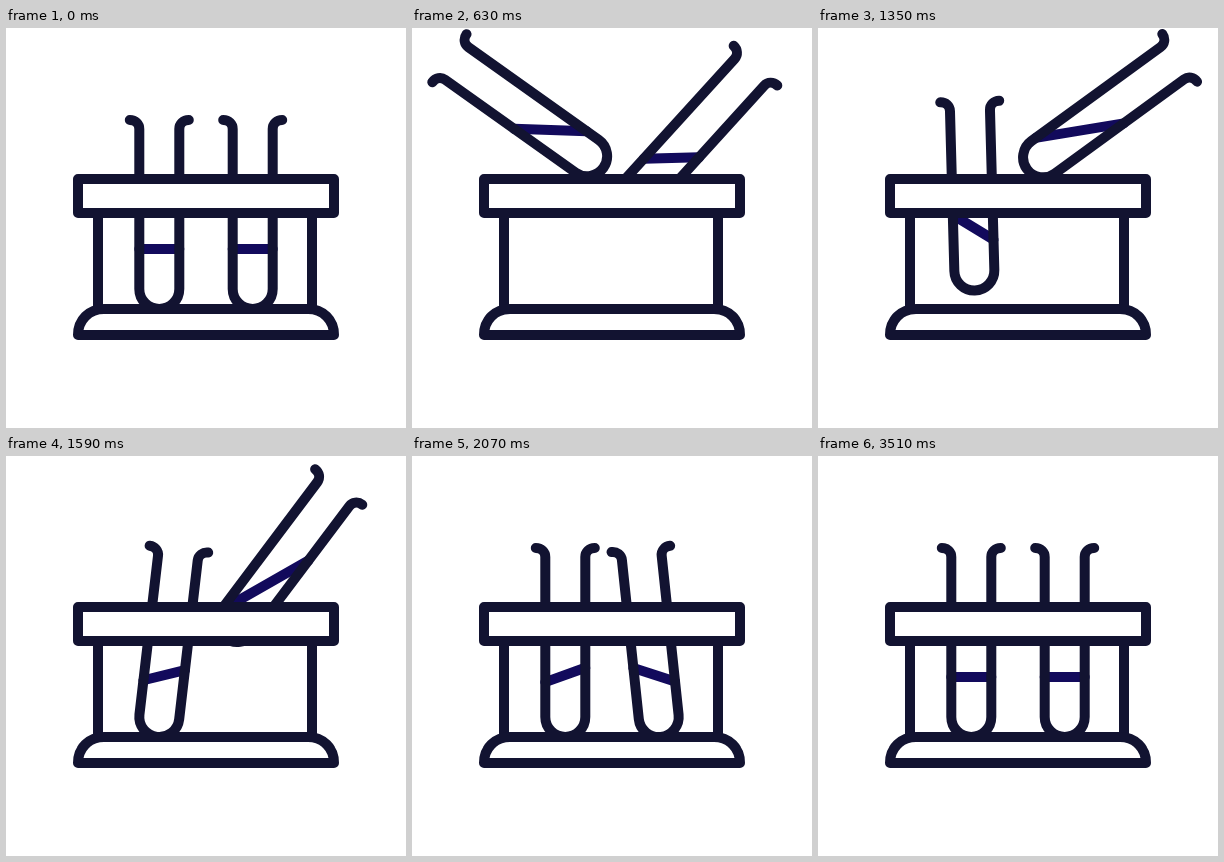
Animation of 400x400 px, one loop 5.63 s. Source, as an HTML page:

```html
<!DOCTYPE html>
<html lang="en">
<head>
<meta charset="utf-8">
<title>Test tubes</title>
<style>
html, body { margin: 0; width: 100%; height: 100%; overflow: hidden; background: #fff; }
svg { display: block; width: 100%; height: 100%; }
path { fill: none; stroke: #121331; stroke-width: 10; stroke-linecap: round; stroke-linejoin: round; }
.liquid { stroke: #120a5c; }
.bar { fill: #fff; }
</style>
</head>
<body>
<svg viewBox="0 0 400 400">
  <defs>
    <path id="glass" d="M-29.5-169C-24-169-20-165-20-160V0A20 20 0 0 0 20 0V-160C20-165 24-169 29.5-169"/>
  </defs>
  <g class="tube"><path class="liquid"/><use href="#glass"/></g>
  <g class="tube"><path class="liquid"/><use href="#glass"/></g>
  <path d="M92 185V281M306 185V281"/>
  <path d="M72 307C72 292 83 281 98 281H302C317 281 328 292 328 307Z"/>
  <path class="bar" d="M72 151H328V185H72Z"/>
</svg>
<script>
const LOOP = 5630, DIP_END = 150;

const ramp = (t, from, to) => Math.min(1, Math.max(0, (t - from) / (to - from)));
const smooth = u => u * u * (3 - 2 * u);
const ease = (t, from, to) => smooth(ramp(t, from, to));

// The tube dips, leaps out, drops back with a small overshoot; then its liquid sloshes
function pose(t, peakTime) {
  const after = t - peakTime;
  const dip = ease(t, 0, DIP_END);
  const rise = 1 - Math.pow(1 - ramp(t, DIP_END, peakTime), 2.2);
  const drop = smooth(ramp(after, 0, 755) ** 2);
  const slosh = ramp(after, 1275, 2370);
  const lean = 57 * rise + 10 * ease(after, -60, 400) - 95 * ease(after, 430, 1000);
  return {
    tilt: 55 * rise - 62 * drop + 7 * ease(after, 860, 1170),
    x: 46.7 - 22 * (rise - drop),
    y: 261 + 20 * dip - 154 * rise + 134 * drop,
    level: lean * (1 - slosh) * Math.cos(slosh * 7) * Math.PI / 180
  };
}

const tubes = [...document.querySelectorAll('.tube')].map((node, i) => ({
  node,
  liquid: node.querySelector('.liquid'),
  side: i ? 1 : -1,
  peakTime: i ? 1140 : 690
}));

function draw(t) {
  for (const { node, liquid, side, peakTime } of tubes) {
    const { tilt, x, y, level } = pose(t, peakTime);
    const mid = -40 - 6 * Math.abs(Math.sin(level));
    const dy = 20 * Math.tan(level);
    node.setAttribute('transform',
      `translate(200 0) scale(${side} 1) translate(${x} ${y}) rotate(${tilt})`);
    liquid.setAttribute('d', `M-20 ${mid + dy}L20 ${mid - dy}`);
  }
}

const start = performance.now();
function tick() {
  draw((performance.now() - start) % LOOP);
  requestAnimationFrame(tick);
}
tick();
</script>
</body>
</html>
```
